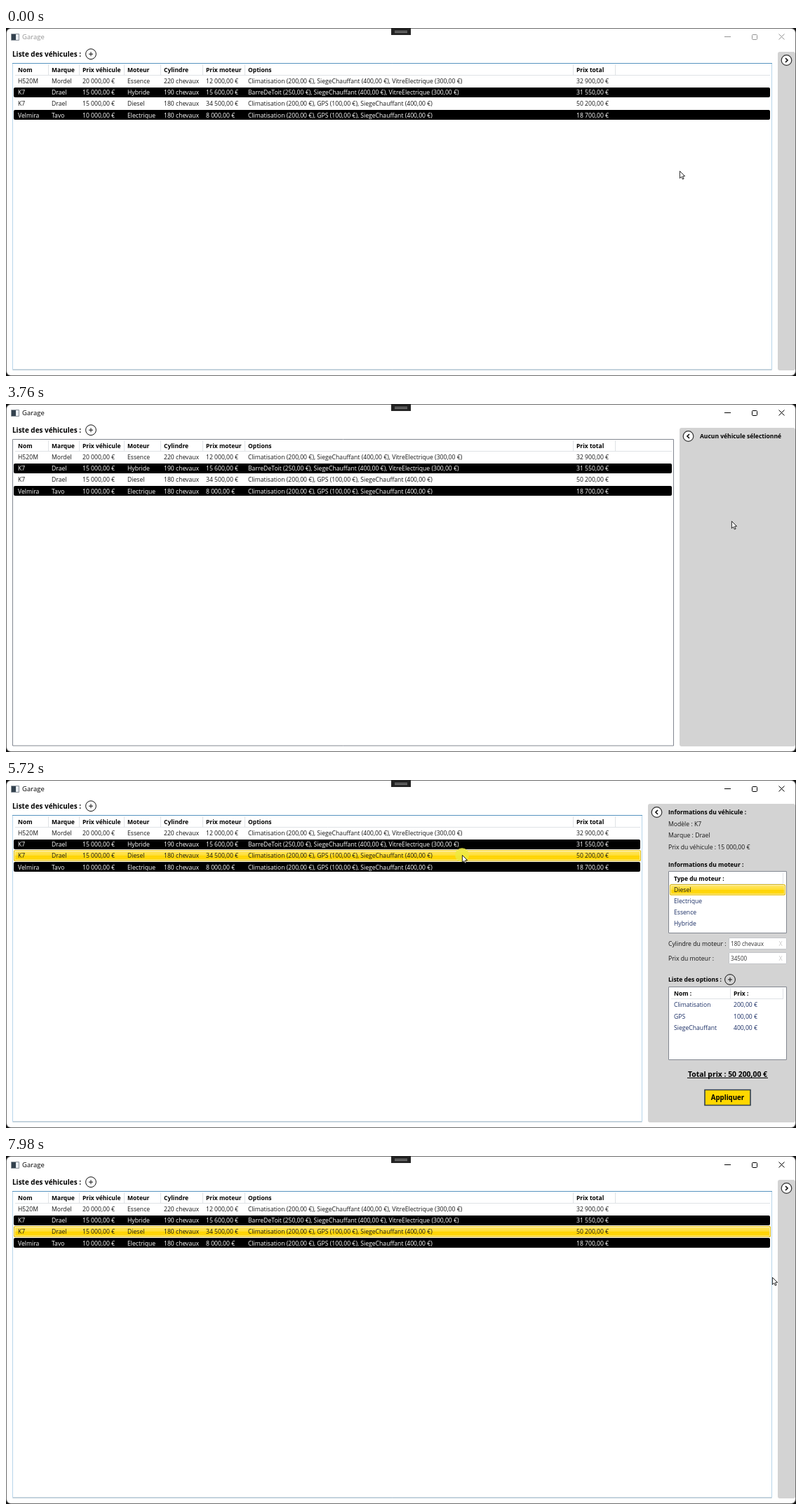
Animation of 1126 by 497 pixels, one loop 8 s. Source, as an HTML page with a canvas:

```html
<!DOCTYPE html>
<html lang="fr">
<head>
<meta charset="utf-8">
<title>Garage</title>
<style>
html, body { margin: 0; width: 100%; height: 100%; overflow: hidden; background: #000; }
canvas { display: block; }
</style>
</head>
<body>
<canvas id="stage" width="1126" height="497"></canvas>
<script>
const ctx = document.getElementById('stage').getContext('2d');
const LOOP = 8000, STEP = 70, LINE = 16.15;
const FONT = '"Open Sans", "Noto Sans", sans-serif';
const INK = '#161616', GREY = '#828790';
const FOCUS = 2180, OPEN = 3150, SELECT = 5650, CLOSE = 7250;

// Pointer moves: start, end, x, y
const HOME = [960, 204];
const MOVES = [
  [850, 1560, 1070, 172], [1560, 1700, 1101, 166], [2570, 2850, 1110, 162],
  [3410, 4230, 1009, 168], [4230, 4840, 671, 122], [4840, 5180, 650, 107],
  [6130, 6620, 912, 147], [6750, 7170, 926, 136], [7170, 7370, 934, 115],
  [7370, 7980, 1092, 173]
];
const CLICKS = [2110, 2980, 5580, 7030];

const euro = n => String(n).replace(/\B(?=(\d{3})+$)/, ' ') + ',00 €';
const PRICES = { Climatisation: 200, GPS: 100, BarreDeToit: 250, SiegeChauffant: 400, VitreElectrique: 300 };

function vehicle(name, make, price, engine, power, enginePrice, options) {
  const total = options.reduce((sum, o) => sum + PRICES[o], price + enginePrice);
  const list = options.map(o => `${o} (${euro(PRICES[o])})`).join(', ');
  return [name, make, euro(price), engine, `${power} chevaux`, euro(enginePrice), list, euro(total)];
}

const CHOSEN = ['Climatisation', 'GPS', 'SiegeChauffant'];
const ROWS = [
  vehicle('H520M', 'Mordel', 20000, 'Essence', 220, 12000, ['Climatisation', 'SiegeChauffant', 'VitreElectrique']),
  vehicle('K7', 'Drael', 15000, 'Hybride', 190, 15600, ['BarreDeToit', 'SiegeChauffant', 'VitreElectrique']),
  vehicle('K7', 'Drael', 15000, 'Diesel', 180, 34500, CHOSEN),
  vehicle('Velmira', 'Tavo', 10000, 'Electrique', 180, 8000, CHOSEN)
];
const HEADERS = ['Nom', 'Marque', 'Prix véhicule', 'Moteur', 'Cylindre', 'Prix moteur', 'Options', 'Prix total'];
const COLUMNS = [17, 65, 109, 173, 225, 285, 345, 813];
const GOLD = ['#ffe873', '#ffdd30', '#ffd400', '#ffd91c', '#dfbb10'];
const BLUE = ['#c3e6fd', '#9dd6fc', '#7ac5fa', '#92d2ff', '#84c0ea'];
const ARROW = new Path2D('M.4 .4V10.6L2.8 8.4 4.4 12 6.1 11.2 4.5 7.8 7.6 7.6Z');

const isOpen = t => t >= OPEN && t < CLOSE;
const panelLeft = t => !isOpen(t) ? 1100 : t < SELECT ? 960 : 915;

function pointerAt(t) {
  let [x, y] = HOME;
  for (const [start, end, toX, toY] of MOVES) {
    if (t < start) break;
    const held = Math.floor((t - start) / STEP) * STEP;
    const p = t >= end ? 1 : 1 - (1 - held / (end - start)) ** 2.5;
    x += (toX - x) * p;
    y += (toY - y) * p;
  }
  return [Math.round(x), Math.round(y)];
}

const overList = t => pointerAt(t)[0] < panelLeft(t) - 8;

// The border follows the pointer late, in three steps
function listHover(t) {
  let sum = 0;
  for (let i = 2; i < 5; i++) sum += overList(t - i * STEP) ? 1 : 0;
  return sum / 3;
}

function text(s, x, y, { size = 8.63, bold = false, color = INK, align = 'left' } = {}) {
  ctx.font = `${bold ? 'bold ' : ''}${size}px ${FONT}`;
  ctx.fillStyle = color;
  ctx.textAlign = align;
  ctx.fillText(s, x, y + size * 0.36);
}
const title = (s, x, y, size = 8.5) => text(s, x, y, { size, bold: true, color: '#000' });

function box(x, y, w, h, fill, r = 0) {
  ctx.fillStyle = fill;
  ctx.beginPath();
  ctx.roundRect(x, y, w, h, r);
  ctx.fill();
}

function outline(x, y, w, h, color, r = 0, width = 1) {
  ctx.strokeStyle = color;
  ctx.lineWidth = width;
  ctx.beginPath();
  ctx.roundRect(x, y, w, h, r);
  ctx.stroke();
}

function lines(color, width, ...paths) {
  ctx.strokeStyle = color;
  ctx.lineWidth = width;
  ctx.beginPath();
  for (const [x, y, ...rest] of paths) {
    ctx.moveTo(x, y);
    for (let i = 0; i < rest.length; i += 2) ctx.lineTo(rest[i], rest[i + 1]);
  }
  ctx.stroke();
}

function disc(x, y, r, fill, stroke, width = 1) {
  ctx.beginPath();
  ctx.arc(x, y, r, 0, Math.PI * 2);
  ctx.fillStyle = fill;
  ctx.fill();
  if (!stroke) return;
  ctx.strokeStyle = stroke;
  ctx.lineWidth = width;
  ctx.stroke();
}

function plusButton(x, y, fill) {
  disc(x, y, 7.4, fill, '#111');
  lines('#111', 1, [x - 3, y, x + 3, y], [x, y - 3, x, y + 3]);
}

function glossRow(x, y, w, h, tones) {
  const g = ctx.createLinearGradient(0, y, 0, y + h);
  [0, 0.5, 0.5, 1].forEach((stop, i) => g.addColorStop(stop, tones[i]));
  box(x, y, w, h, g, 2);
  outline(x + 0.5, y + 0.5, w - 1, h - 1, tones[4], 1.5);
  outline(x + 1.5, y + 1.5, w - 3, h - 3, 'rgba(255,255,255,0.6)', 1);
}

function headerRule(x0, x1, top, bottom, marks) {
  lines('#dfe2e6', 1, [x0, bottom + 0.5, x1, bottom + 0.5], ...marks.map(x => [x + 0.5, top, x + 0.5, bottom]));
}

function panelList(y, h) {
  box(944, y, 169, h, '#fff');
  outline(944.5, y + 0.5, 168, h - 1, GREY);
}

function drawWindow(active) {
  ctx.fillStyle = '#111';
  ctx.fillRect(0, 0, 1126, 497);
  box(0, 0, 1126, 497, '#6b6b6b', 7);
  box(1, 1, 1124, 495, '#fff', 6);
  box(549, 0, 28, 10, '#232323');
  lines('#8c8c8c', 1, [554, 4.5, 572, 4.5], [554, 6.5, 572, 6.5]);

  box(7, 8, 12, 10, '#e9edf2');
  box(8, 9, 6, 8, '#33414e');
  outline(7.5, 8.5, 11, 9, '#8b939b');

  const tone = active ? '#000' : '#949494';
  text('Garage', 23, 13, { size: 9.5, color: tone });
  lines(tone, 1, [1024, 12.5, 1033, 12.5], [1101.5, 8.5, 1109.5, 16.5], [1109.5, 8.5, 1101.5, 16.5]);
  outline(1063.5, 9.5, 7, 7, tone, 1);

  title('Liste des véhicules :', 9, 37, 9.95);
  plusButton(121, 37.2, '#fff');
}

function drawList(side, hover, rowTone) {
  const right = side - 8.5, end = side - 11, bottom = 488;
  outline(9.5, 50.5, right - 9.5, bottom - 50.5, GREY);
  if (hover > 0) {
    ctx.globalAlpha = hover;
    lines('#b7d5ea', 1, [9.5, 50, 9.5, bottom], [right, 50, right, bottom]);
    lines('#c7e2f1', 1, [9, bottom, right, bottom]);
    lines('#5794bf', 1, [9, 50.5, right + 0.5, 50.5]);
    ctx.globalAlpha = 1;
  }
  headerRule(13, end, 52, 67, [...COLUMNS.slice(1).map(x => x - 5), 868]);
  HEADERS.forEach((h, i) => title(h, COLUMNS[i], 60));

  ROWS.forEach((row, r) => {
    const y = 76 + r * LINE, top = Math.round(y - 7);
    const dark = r % 2 === 1;
    if (dark) box(11, top, end - 11, 14, '#000', 2);
    if (r === 2 && rowTone) glossRow(11, top - 1, end - 10, 16, rowTone);
    row.forEach((s, i) => text(s, COLUMNS[i], y, { color: dark ? '#fff' : INK }));
  });
}

function drawToggle(x, open, hover, pressed) {
  const fill = !hover ? '#fff' : pressed ? '#d9ecff' : '#f3f9ff';
  const stroke = !hover ? '#333' : pressed ? '#3c77dd' : '#5593ff';
  disc(x, 46, 7.3, fill, stroke, hover ? 1.5 : 1.2);
  const d = open ? -1.5 : 1.5;
  lines('#111', 1.7, [x - d, 43, x + d, 46, x - d, 49]);
}

function field(label, value, y) {
  text(label, 944, y);
  box(1030, y - 9, 83, 17, '#fff');
  outline(1030.5, y - 8.5, 82, 16, '#c4c6ca');
  text(value, 1033, y, { size: 8.1, color: '#333' });
  text('X', 1104, y, { size: 9, color: '#c8c8c8', align: 'center' });
}

function drawDetails([name, make, price, engine, power, , , total]) {
  const navy = { color: '#1b2f66' };
  title('Informations du véhicule :', 944, 46);
  [`Modèle : ${name}`, `Marque : ${make}`, `Prix du véhicule : ${price}`].forEach((s, i) =>
    text(s, 944, 62.5 + i * 16.5));

  title('Informations du moteur :', 944, 120.5);
  panelList(130, 89);
  title('Type du moteur :', 952, 140.5);
  headerRule(948, 1108, 133, 148, [1107]);
  glossRow(946, 149, 165, 15.5, GOLD);
  ['Diesel', 'Electrique', 'Essence', 'Hybride'].forEach((s, i) =>
    text(s, 952, 156.7 + i * LINE, s === engine ? {} : navy));

  field('Cylindre du moteur :', power, 234);
  field('Prix du moteur :', '34500', 255);

  title('Liste des options :', 944, 285);
  plusButton(1032, 285, '#d3d3d3');
  panelList(295, 105);
  title('Nom :', 952, 305);
  title('Prix :', 1037, 305);
  headerRule(948, 1108, 297, 312, [1032, 1107]);
  CHOSEN.forEach((s, i) => {
    const y = 321.3 + i * LINE;
    text(s, 952, y, navy);
    text(euro(PRICES[s]), 1037, y, navy);
  });

  text(`Total prix : ${total}`, 1028.5, 420, { size: 10.4, bold: true, color: '#000', align: 'center' });
  lines('#000', 1, [971, 425.5, 1086, 425.5]);
  box(996, 442, 65, 23, '#ffd700');
  outline(996, 442.5, 65, 22, '#34424f', 0, 1.6);
  text('Appliquer', 1028.5, 453.3, { size: 9.7, bold: true, color: '#000', align: 'center' });
}

function drawPointer(x, y) {
  ctx.save();
  ctx.translate(x, y);
  ctx.fillStyle = '#fff';
  ctx.fill(ARROW);
  ctx.strokeStyle = '#111';
  ctx.lineWidth = 0.9;
  ctx.lineJoin = 'round';
  ctx.stroke(ARROW);
  ctx.restore();
}

function draw(t) {
  const open = isOpen(t), side = panelLeft(t), selected = t >= SELECT;
  const [px, py] = pointerAt(t);
  const pressed = CLICKS.some(c => t >= c && t < c + 2 * STEP + 20);
  const onToggle = px > side + 1 && px < side + 25;
  const onRow = overList(t) && py >= 100 && py < 116;

  drawWindow(t >= FOCUS);
  drawList(side, listHover(t), selected ? GOLD : onRow ? BLUE : null);
  box(side, 34, 1125 - side, 455, '#d3d3d3', 3);
  drawToggle(side + 12.5, open, onToggle, pressed);
  if (open && selected) drawDetails(ROWS[2]);
  else if (open) title('Aucun véhicule sélectionné', 989, 46);

  if (pressed) disc(px, py, 10, 'rgba(238,234,62,0.8)');
  drawPointer(px, py);
}

function tick() {
  draw(performance.now() % LOOP);
  requestAnimationFrame(tick);
}
tick();
</script>
</body>
</html>
```
